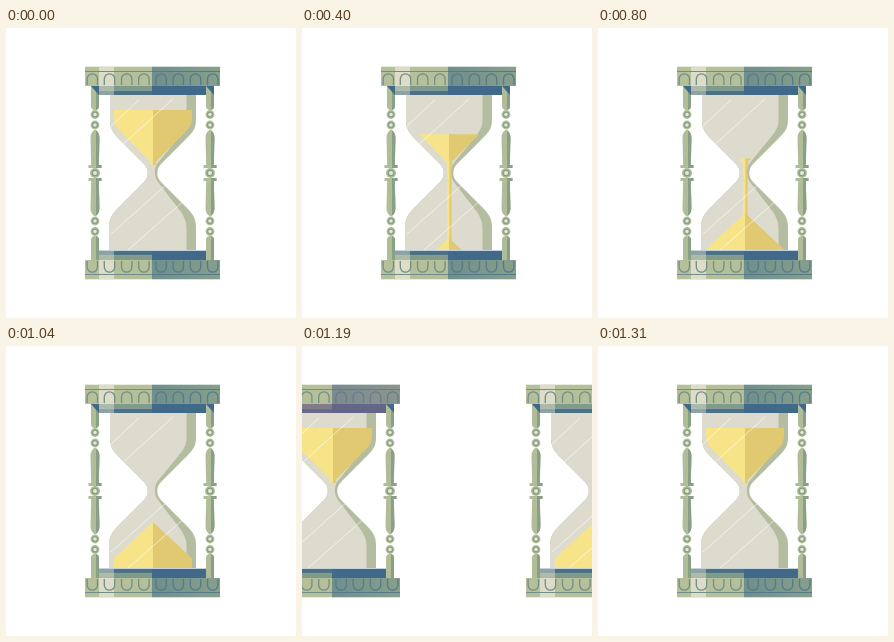
These frames come from a looping animation (290x290 px, 1.34 s). An HTML page with a canvas:

```html
<!DOCTYPE html>
<html lang="en">
<head>
<meta charset="utf-8">
<title>Hourglass</title>
<style>
html, body { margin: 0; width: 100%; height: 100%; overflow: hidden; background: #fff; }
canvas { display: block; }
</style>
</head>
<body>
<canvas id="stage" width="290" height="290"></canvas>
<script>
const ctx = document.getElementById('stage').getContext('2d');
const LOOP = 1340, SLIDE_START = 1040, POUR_STEPS = 13, SPACING = 261;
const MID = 146.5, FLOOR = 222;
const C = {
  stone: '#b5bf99', pale: '#dcdcc8', teal: '#6f8f8c', moss: '#87a08c',
  line: '#718f88', deepLine: '#557a87', blue: '#4b7183', deep: '#41698a', recess: '#809a8a',
  post: '#b1bd99', postDark: '#88a085', dot: '#e6e8d8',
  glass: '#dddbce', shade: '#b5bda0', sand: '#f7e488', sandDark: '#e0c970'
};

function rect(x1, y1, x2, y2, color) {
  ctx.fillStyle = color;
  ctx.fillRect(x1, y1, x2 - x1, y2 - y1);
}

function fillPath(d, color) {
  ctx.fillStyle = color;
  ctx.fill(new Path2D(d));
}

function disc(x, y, r, color) {
  ctx.fillStyle = color;
  ctx.beginPath();
  ctx.arc(x, y, r, 0, Math.PI * 2);
  ctx.fill();
}

function clipped(path, draw) {
  ctx.save();
  ctx.clip(path);
  draw();
  ctx.restore();
}

// Draws once as is and once mirrored about the middle of the stage.
function topAndBottom(draw) {
  draw();
  ctx.save();
  ctx.transform(1, 0, 0, -1, 0, 290);
  draw();
  ctx.restore();
}

const leftWall = 'M104 67 V92 C104 100 107 105 112 110 L138 136 C143 141 143 149 138 154 ' +
  'L112 180 C106 186 103 191 103 199 V222';
const glassShape = new Path2D(leftWall +
  ' H190 V199 C190 191 187 186 181 180 L155 154 C150 149 150 141 155 136 ' +
  'L181 110 C187 104 190 100 190 92 V67 Z');
const litGlass = leftWall + ' H180.5 V200 C180.5 193 178 189 175 184 L152 154 ' +
  'C148 149 148 141 151 136 L173 109 C179 102 180.5 98 180.5 91 V67 Z';
const upperRoom = new Path2D('M108 82 H186 V90 Q186 97 181 102 L149.5 134 V137 H144.5 V134 L113 102 Q108 97 108 90 Z');
const lowerRoom = new Path2D('M147 160 L186 200 V222 H108 V200 Z');
const postShape = 'M-4 58 H4 V78 Q4 82 0 82 Q-4 82 -4 78 Z ' +
  'M0 101.5 Q4.5 104 4.5 110 L3.8 137 H6.5 V140 H-6.5 V137 H-3.8 L-4.5 110 Q-4.5 104 0 101.5 Z';
const postShadow = new Path2D('M1 55 H8 V145 H1 Z');

function arches() {
  ctx.lineWidth = 1.3;
  for (let i = 0; i < 8; i++) {
    const x = MID + (i - 3.5) * 17.2;
    ctx.strokeStyle = i < 4 ? C.line : C.deepLine;
    ctx.beginPath();
    ctx.moveTo(x - 5.2, 57);
    ctx.lineTo(x - 5.2, 51);
    ctx.arc(x, 51, 5.2, Math.PI, 0);
    ctx.lineTo(x + 5.2, 57);
    ctx.stroke();
  }
}

function slab() {
  const shadow = ctx.createLinearGradient(146, 0, 214, 0);
  shadow.addColorStop(0, C.teal);
  shadow.addColorStop(1, C.moss);
  rect(79, 38.7, 146, 58, C.stone);
  rect(93, 38.7, 108, 58, C.pale);
  rect(146, 38.7, 214, 58, shadow);
  rect(79, 43, 146, 44, C.line);
  rect(146, 43, 214, 44, C.deepLine);
  arches();
}

function beam() {
  rect(93, 58, 146, 62.5, C.recess);
  rect(93, 62.5, 146, 67, C.blue);
  rect(93, 58, 108, 67, 'rgba(225,226,205,.45)');
  rect(146, 58, 205, 67, C.deep);
}

function ring(y, r) {
  disc(0, y, r, C.post);
  disc(0, y, r * .7, C.postDark);
  disc(0, y, r * .4, C.dot);
}

function post(x) {
  ctx.save();
  ctx.translate(x, 0);
  topAndBottom(() => {
    fillPath(postShape, C.post);
    clipped(postShadow, () => fillPath(postShape, C.postDark));
    ring(86.5, 4.4);
    ring(97, 4.4);
  });
  ring(145, 5);
  fillPath('M-4 58 H4 V67 Z', C.deep);
  ctx.restore();
}

function sand(step) {
  const level = 82 + 4.85 * step;
  if (step <= 10) clipped(upperRoom, () => {
    rect(100, level, 147, 137, C.sand);
    rect(147, level, 190, 137, C.sandDark);
  });

  const height = step < 3 ? 0 : Math.min(46, 2 + 5 * (step - 3));
  const peak = FLOOR - height;
  if (step > 0 && step < POUR_STEPS) {
    const fall = Math.max(0, step - 10);
    const top = 131 + 14 * fall * fall;
    const bottom = Math.min(peak + 3, 131 + 33 * step);
    if (bottom > top) {
      rect(145, top, 147.5, bottom, C.sand);
      rect(147.5, top, 149.5, bottom, C.sandDark);
    }
  }
  if (height) clipped(lowerRoom, () => {
    const reach = height * 1.07;
    fillPath(`M147 ${peak} V222 H${147 - reach} Z`, C.sand);
    fillPath(`M147 ${peak} V222 H${147 + reach} Z`, C.sandDark);
  });
}

function streaks() {
  ctx.strokeStyle = 'rgba(255,255,255,.6)';
  ctx.lineWidth = 1;
  const lines = [[105, 98, 133, 72], [114, 119, 167, 71], [105, 206, 161, 156], [122, 222, 188, 164]];
  for (const [x1, y1, x2, y2] of lines) {
    ctx.beginPath();
    ctx.moveTo(x1, y1);
    ctx.lineTo(x2, y2);
    ctx.stroke();
  }
}

function hourglass(x, step, tinted) {
  ctx.save();
  ctx.translate(x, 0);
  topAndBottom(beam);
  rect(93, 222, 205, 223, 'rgba(65,105,138,.3)');
  if (tinted) rect(93, 58, 200, 67, 'rgba(130,100,135,.55)');
  ctx.fillStyle = C.shade;
  ctx.fill(glassShape);
  fillPath(litGlass, C.glass);
  sand(step);
  clipped(glassShape, streaks);
  post(89);
  post(204);
  topAndBottom(slab);
  if (tinted) rect(146, 38.7, 214, 58, 'rgba(150,125,150,.3)');
  ctx.restore();
}

function draw(now) {
  const t = now % LOOP;
  rect(0, 0, 290, 290, '#fff');
  if (t < SLIDE_START) {
    hourglass(0, Math.floor(t / 80), false);
  } else {
    const slide = Math.floor((t - SLIDE_START) / 30);
    const x = slide * SPACING / 9;
    hourglass(x, POUR_STEPS, false);
    hourglass(x - SPACING, 0, slide < 9);
  }
}

const start = performance.now();
function tick() {
  draw(performance.now() - start);
  requestAnimationFrame(tick);
}
tick();
</script>
</body>
</html>
```
